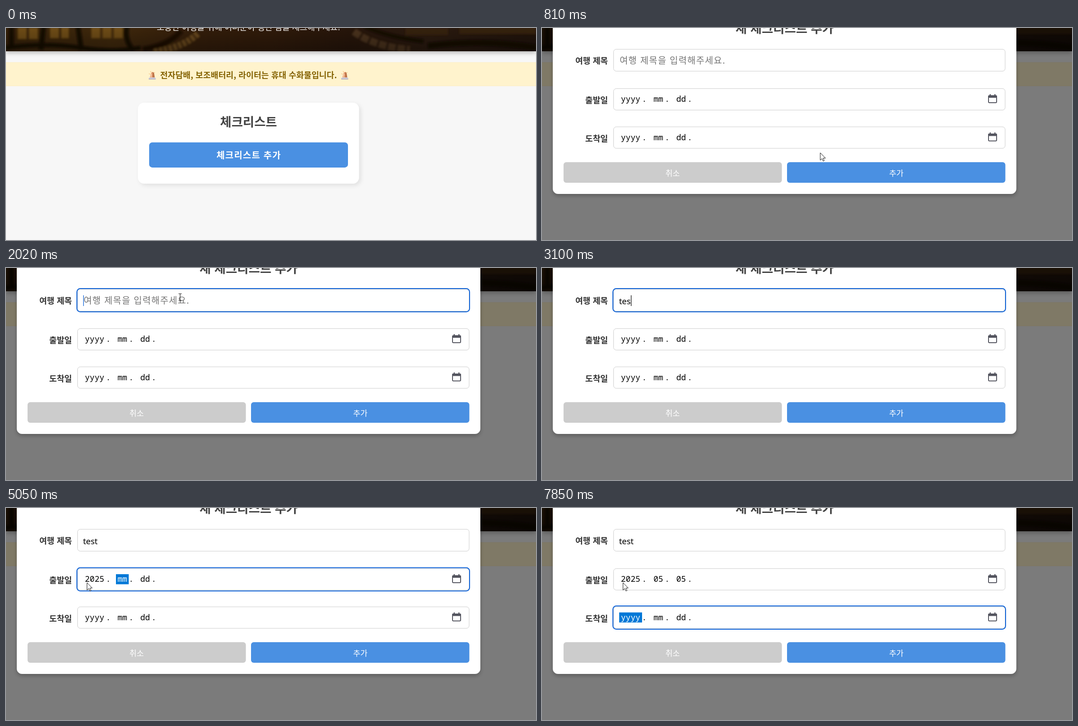
Recreate the animation shown at these times as an HTML page. Size 1181x474 px, loop 8 s.

```html
<!DOCTYPE html>
<html lang="ko">
<head>
<meta charset="utf-8">
<title>체크리스트</title>
<style>
  html, body { margin: 0; width: 100%; height: 100%; overflow: hidden; background: #f7f7f7; }
  svg { display: block; width: 100%; height: 100%; }
  text { font-family: "Noto Sans CJK KR", "Noto Sans CJK", sans-serif; white-space: pre; }
  .mid { text-anchor: middle; }
  .end { text-anchor: end; }
  .bold { font-weight: 700; }
  .mono { font: 18px "Noto Sans Mono", monospace; }
  .typed { font: 18.4px "Noto Sans", sans-serif; }
</style>
</head>
<body>
<svg viewBox="0 0 1181 474" lang="ko">
  <defs>
    <linearGradient id="wood" x1="0" x2="1" y1="0" y2="0">
      <stop offset="0" stop-color="#352109"/>
      <stop offset=".2" stop-color="#3f280c"/>
      <stop offset=".36" stop-color="#331d0a"/>
      <stop offset=".5" stop-color="#2f1a0a"/>
      <stop offset=".65" stop-color="#26150a"/>
      <stop offset=".8" stop-color="#2a1a0f"/>
      <stop offset="1" stop-color="#20130b"/>
    </linearGradient>
    <linearGradient id="fade" x1="0" x2="0" y1="0" y2="1">
      <stop offset="0" stop-color="#000" stop-opacity="0"/>
      <stop offset="1" stop-color="#000" stop-opacity=".3"/>
    </linearGradient>
    <filter id="soft" x="-10%" y="-40%" width="120%" height="180%"><feGaussianBlur stdDeviation="2"/></filter>
    <filter id="headShade" x="-5%" y="-50%" width="110%" height="220%"><feDropShadow dx="0" dy="4" stdDeviation="5" flood-opacity=".25"/></filter>
    <filter id="cardShade" x="-10%" y="-10%" width="120%" height="130%"><feDropShadow dx="4" dy="4" stdDeviation="5" flood-opacity=".09"/></filter>
    <filter id="modalShade" x="-5%" y="-5%" width="110%" height="115%"><feDropShadow dx="0" dy="4" stdDeviation="5" flood-opacity=".25"/></filter>
    <clipPath id="headClip"><rect width="1181" height="52"/></clipPath>

    <g id="siren">
      <path d="M1.500 7l2.500 1.500M5 1.500l1.500 2.500M14.500 4l-1.500 1.500" stroke="#f5bd78" stroke-width="1.300"/>
      <path d="M3.500 16L6 6.500Q7 3.500 9.500 3.500T13 7l1.500 9z" fill="#e9a274"/>
      <path d="M9.500 3.500Q12.500 3.500 13 7l1.500 9h-5z" fill="#bd7448"/>
      <path d="M7.500 7.500l-1.500 7" stroke="#fbdcc0" stroke-width="1.300"/>
      <path d="M1 20v-2.500q0-2 2-2h11.500q2 0 2 2v2.500z" fill="#d3d2dd"/>
      <path d="M1 18.500h15.500v1.500H1z" fill="#aaa8b8"/>
    </g>
    <g id="calendar">
      <rect x="995" y="151.500" width="18" height="15.500" rx="2" fill="none" stroke="#54555f" stroke-width="2"/>
      <path d="M994 156v-3q0-2.500 2.500-2.500h15q2.500 0 2.500 2.500v3zM997.500 148h2.500v4h-2.500zM1008 148h2.500v4h-2.500z" fill="#54555f"/>
    </g>
    <path id="arrow" d="M0 0V16.500L3.900 13 6.400 18.600 9 17.500 6.500 12H11.700Z" fill="#fff" stroke="#111" stroke-linejoin="round"/>
    <path id="hand" d="M-1 2.500Q-1 .2 .8 .2T2.600 2.500V8Q5 7 5.800 9 8 8 8.800 10 11.500 9.500 11.600 12.500V16Q11.500 19 10 21V24H1.500V22Q-1 19-5 14.500-6.500 12-4.500 11.300-3 11-1 13.500Z" fill="#fff" stroke="#111" stroke-linejoin="round"/>
    <path id="beam" d="M-3.500-7.500H-1Q0-7.500 0-6.500 0-7.500 1-7.500H3.500M0-6.500V7M-3.500 8H-1Q0 8 0 7 0 8 1 8H3.500" fill="none" stroke="#222" stroke-width="1.200"/>
  </defs>

  <rect width="1181" height="474" fill="#f7f7f7"/>

  <rect width="1181" height="52" fill="#1f1209" filter="url(#headShade)"/>
  <g clip-path="url(#headClip)">
    <rect width="1181" height="52" fill="url(#wood)"/>
    <g filter="url(#soft)" fill="none">
      <path d="M26 12H74M98 10H140M190 10H262" stroke="#6d4c19" stroke-width="26" stroke-dasharray="20 5"/>
      <path d="M12-5V45M84-5L78 48M160-5L168 50M270-5Q262 26 285 52" stroke="#150b04" stroke-width="11"/>
      <path d="M0 44Q90 32 165 44T300 44" stroke="#150b04" stroke-width="9"/>
      <path d="M305 48Q365 38 390 6" stroke="#1c0f06" stroke-width="12"/>
      <path d="M330 54Q395 44 428 12" stroke="#69491f" stroke-width="15" stroke-dasharray="8 3"/>
      <path d="M775 8Q820 42 900 48" stroke="#49331f" stroke-width="16" stroke-dasharray="17 4"/>
      <path d="M800-3Q850 20 930 30" stroke="#170d06" stroke-width="9"/>
      <path d="M890 8H985M1010 6H1181" stroke="#35210f" stroke-width="16"/>
      <path d="M940 40Q1070 24 1181 44" stroke="#140b06" stroke-width="13"/>
    </g>
    <rect width="1181" height="52" fill="url(#fade)"/>
    <text class="mid" x="540.500" y="5" font-size="18.400" fill="#fff">소중한 여행을 위해 여러분이 챙긴 짐을 체크해주세요!</text>
  </g>

  <rect y="77" width="1181" height="53" fill="#fff3cd"/>
  <path d="M0 77H1181M0 129.500H1181" stroke="#fdeec6"/>
  <use href="#siren" x="317" y="95"/>
  <use href="#siren" x="746" y="95"/>
  <text class="mid bold" x="540.500" y="112" font-size="18.400" fill="#856404">전자담배, 보조배터리, 라이터는 휴대 수화물입니다.</text>

  <rect x="294" y="167" width="492.500" height="181" rx="14" fill="#fff" filter="url(#cardShade)"/>
  <text class="mid bold" x="540.500" y="220" font-size="27.600" fill="#444">체크리스트</text>
  <rect id="open" x="319" y="255.700" width="443" height="56.200" rx="7"/>
  <text class="mid bold" x="541" y="291.500" font-size="20" letter-spacing="1.200" fill="#fff">체크리스트 추가</text>

  <g id="modal">
    <rect width="1181" height="474" opacity=".5"/>
    <rect x="24" y="-40" width="1033" height="411" rx="12" fill="#fff" filter="url(#modalShade)"/>
    <text class="mid bold" x="540.500" y="11" font-size="27.600" fill="#444">새 체크리스트 추가</text>
    <g id="rows"></g>
    <text id="hint" x="173" y="80" font-size="20" letter-spacing="1.200" fill="#757575">여행 제목을 입력해주세요.</text>
    <text id="name" class="typed" x="171.700" y="80.500"></text>
    <rect id="caret" y="61" width="1.300" height="24"/>
    <rect id="pickRing" x="989" y="147" width="30" height="25" rx="3" fill="none" stroke="#0a60d8" stroke-width="2"/>
    <rect id="ring" x="158" width="875" height="52" rx="7.500" fill="none" stroke="#0a60d8" stroke-width="2"/>
    <rect x="48" y="300" width="486.500" height="46" rx="6" fill="#ccc"/>
    <rect x="546" y="300" width="486.500" height="46" rx="6" fill="#4a90e2"/>
    <g class="mid" font-size="17.500" fill="#fff">
      <text x="291" y="331">취소</text>
      <text x="789.500" y="331">추가</text>
    </g>
  </g>

  <circle id="click" r="15" fill="#ff0" opacity=".5"/>
  <use id="cursor"/>
</svg>
<script>
const LOOP = 8000;
const $ = id => document.getElementById(id);
const show = (el, on) => el.setAttribute("visibility", on ? "visible" : "hidden");
const during = (t, a, b) => t >= a && t < b;

// Latest value of a [time, value] list.
const at = (t, steps) => steps.reduce((v, [from, value]) => t >= from ? value : v, null);

function make(tag, attrs, parent, text) {
  const el = document.createElementNS("http://www.w3.org/2000/svg", tag);
  for (const key in attrs) el.setAttribute(key, attrs[key]);
  if (text) el.textContent = text;
  return parent.appendChild(el);
}

const SEGMENTS = [
  { x: 175.8, box: [172, 51], text: "yyyy", dot: 222.5 },
  { x: 248.5, box: [245, 28.5], text: "mm", dot: 273.5 },
  { x: 299.2, box: [295, 30], text: "dd", dot: 324 }
];

function addRow(label, y, isDate) {
  const g = make("g", {}, $("rows"));
  make("text", { class: "end bold", x: 147, y: y + 32.5, "font-size": 18.4, fill: "#333" }, g, label);
  make("rect", { x: 159.5, y, width: 872.5, height: isDate ? 48 : 49, rx: 6, fill: "#fff", stroke: "#ccc" }, g);
  if (!isDate) return null;
  make("use", { href: "#calendar", y: y - 135.5 }, g);
  return SEGMENTS.map(s => {
    const mark = make("rect", { x: s.box[0], y: y + 12.5, width: s.box[1], height: 22.5, fill: "#0078d7" }, g);
    const text = make("text", { class: "mono", x: s.x, y: y + 29.5 }, g, s.text);
    make("text", { class: "mono", x: s.dot, y: y + 29.5 }, g, ".");
    return { mark, text };
  });
}

addRow("여행 제목", 47.5, false);
const depart = addRow("출발일", 135.5, true);
const arrive = addRow("도착일", 221, true);

const DEPART = [
  [[0, "yyyy"], [4450, "0002"], [4910, "0020"], [4980, "0202"], [5050, "2025"]],
  [[0, "mm"], [6260, "00"], [6590, "05"]],
  [[0, "dd"], [6920, "00"], [6990, "05"]]
];
const SELECTED = [[0, -1], [4180, 0], [5050, 1], [6590, 2], [7520, -1]];
const NAME = [[0, ""], [2700, "t"], [2900, "te"], [3100, "tes"], [3230, "test"]];
const CARET = { "": 172, t: 178, te: 189, tes: 198, test: 204.5 };
const RING = [[0, null], [1890, 46], [4180, 133.5], [7850, 219]];

// Pointer tip: time, x, y.
const PATH = [
  [130, 706, 455], [340, 668, 345], [550, 624, 284], [680, 620, 279], [870, 620, 279],
  [1080, 800, 215], [1240, 960, 118], [1430, 790, 58], [1680, 474, 38],
  [1820, 392, 60], [1890, 388, 65], [3730, 388, 65],
  [3870, 285, 150], [3980, 205, 188], [4110, 180.5, 167], [LOOP, 180.5, 167]
];

function pointer(t) {
  const i = Math.max(1, PATH.findIndex(p => p[0] > t));
  const [t0, x0, y0] = PATH[i - 1], [t1, x1, y1] = PATH[i];
  const k = Math.max(0, (t - t0) / (t1 - t0));
  return [x0 + (x1 - x0) * k, y0 + (y1 - y0) * k];
}

function pointerShape(t, x, y) {
  if (t < 810) return y > 256 && y < 311 ? "hand" : "arrow";
  return x > 160 && x < 1032 && y > 47 && y < 97 ? "beam" : "arrow";
}

function mix(a, b, k) {
  return `rgb(${a.map((v, i) => Math.round(v + (b[i] - v) * k))})`;
}

function select(segment, on) {
  show(segment.mark, on);
  segment.text.setAttribute("fill", on ? "#fff" : "#000");
}

function draw(t) {
  const hover = Math.min(1, Math.max(0, (t - 430) / 220));
  $("open").setAttribute("fill", mix([74, 144, 226], [0, 86, 179], hover));
  $("modal").setAttribute("display", t >= 810 ? "inline" : "none");

  const name = at(t, NAME);
  $("name").textContent = name;
  show($("hint"), !name);
  $("caret").setAttribute("x", CARET[name]);
  $("caret").setAttribute("fill", name ? "#111" : "#0a60d8");
  show($("caret"), during(t, 1890, 2570) || during(t, 2700, 3700));

  const ringY = at(t, RING);
  show($("ring"), ringY !== null);
  if (ringY !== null) $("ring").setAttribute("y", ringY);
  show($("pickRing"), during(t, 7520, 7850));

  const selected = at(t, SELECTED);
  depart.forEach((s, i) => {
    s.text.textContent = at(t, DEPART[i]);
    select(s, i === selected);
  });
  arrive.forEach((s, i) => select(s, t >= 7850 && i === 0));

  const [x, y] = pointer(t);
  const cursor = $("cursor");
  cursor.setAttribute("href", "#" + pointerShape(t, x, y));
  cursor.setAttribute("transform", `translate(${x} ${y})`);
  show(cursor, t >= 130 && !during(t, 2700, 3730));

  const click = $("click");
  click.setAttribute("cx", x - 1);
  click.setAttribute("cy", y);
  show(click, during(t, 610, 810) || during(t, 1890, 2020) || during(t, 4180, 4250));
}

const start = performance.now();
function tick() {
  draw((performance.now() - start) % LOOP);
  requestAnimationFrame(tick);
}
tick();
</script>
</body>
</html>
```
